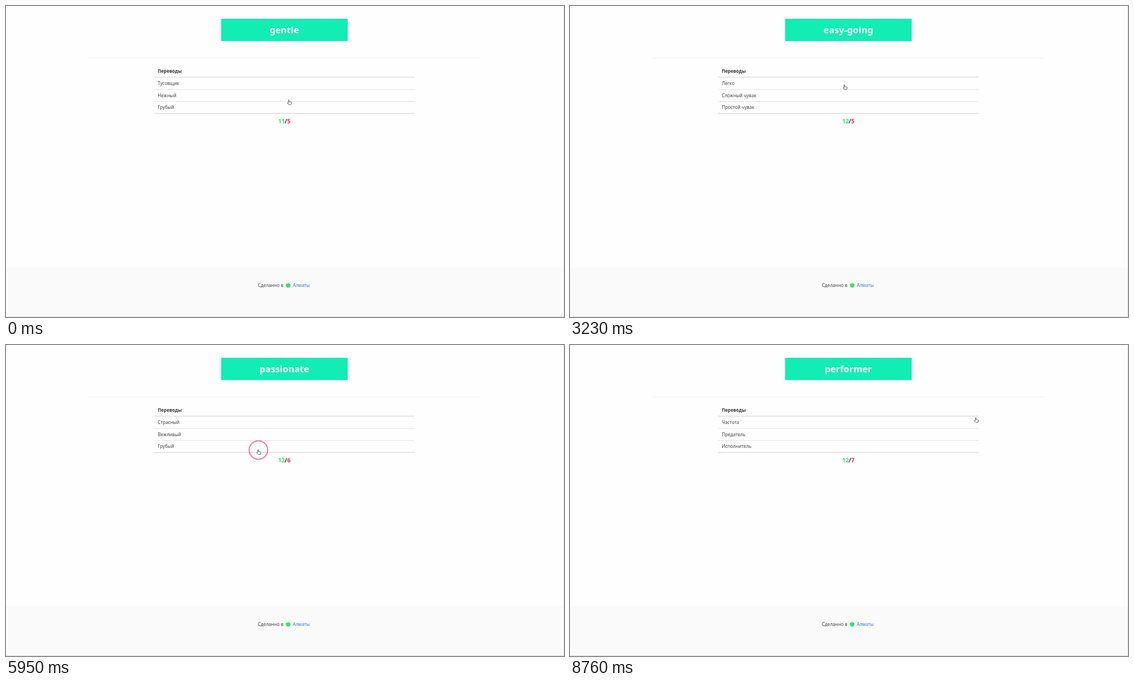
These frames come from a looping animation (1001x559 px, 8920 ms). An HTML page:

```html
<!DOCTYPE html>
<html lang="ru">
<head>
<meta charset="utf-8">
<title>Переводы</title>
<style>
  html, body { margin: 0; width: 100%; height: 100%; overflow: hidden; background: #fefefe; }
  svg { display: block; width: 100vw; height: 100vh; }
  text { font-family: "Noto Sans", "Open Sans", sans-serif; font-size: 8.1px; fill: #444; }
  .bold { font-weight: 700; }
  .title { font-size: 16.4px; fill: #fcfffe; text-anchor: middle; }
  .score { font-size: 10.4px; fill: #363636; text-anchor: middle; }
  .good { fill: #3fdc6b; }
  .bad { fill: #e9205f; }
</style>
</head>
<body>
<svg viewBox="0 0 1001 559">
  <rect width="1001" height="559" fill="#fefefe"/>
  <rect x="386" y="23" width="227" height="40" fill="#12edb3"/>
  <text id="word" class="bold title" x="499.3" y="49.2"></text>
  <rect x="148" y="93" width="704" height="1" fill="#f1f1f1"/>

  <text class="bold" x="272.3" y="120.2" style="fill:#363636">Переводы</text>
  <g fill="#d8d8d8">
    <rect x="266" y="127.3" width="467" height="1.2"/>
    <rect x="266" y="149.6" width="467" height=".9" fill="#e0e0e0"/>
    <rect x="266" y="171" width="467" height=".9" fill="#e0e0e0"/>
    <rect x="266" y="192.5" width="467" height="1.2"/>
  </g>
  <g id="rows"></g>
  <text class="bold score" x="499.3" y="210.8"><tspan id="right" class="good"></tspan>/<tspan id="wrong" class="bad"></tspan></text>

  <rect y="470" width="1001" height="88" fill="#fafafa"/>
  <rect y="558" width="1001" height="1" fill="#dedede"/>
  <rect x="1000" width="1" height="559" fill="#e6e6e6"/>
  <text x="452" y="505.4">Сделанно в</text>
  <g fill="#36e467">
    <path d="M506.2 499.2Q508.6 498 510 499.8Q511 502 509.4 504.8Q508 506.8 506.2 506.1Q504.4 506.8 503 504.8Q501.4 502 502.4 499.8Q503.8 498 506.2 499.2Z"/>
    <path d="M505.9 499V497.2L507 496.8V499Z"/>
  </g>
  <text x="514.5" y="505.4" style="fill:#3f75d6">Алматы</text>

  <circle id="ring" r="16.6" fill="none" stroke="#df1440" stroke-opacity=".55" stroke-width="2"/>
  <path id="hand" fill="#fff" stroke="#444" stroke-width=".85" stroke-linejoin="round"
    d="M2.6 1.3Q2.6 .5 3.3 .5Q4 .5 4 1.3V3.9L7.2 4.5Q8.3 4.8 8.2 5.9L7.6 8.6Q7.4 9.4 6.6 9.4H4Q3.4 9.4 3 8.9L.9 6.6Q.5 6 1 5.7Q1.5 5.4 2 5.8L2.6 6.3Z"/>
</svg>
<script>
const LOOP = 8920;
const GREEN = '#35ee66', RED = '#ee205e';
const ROW_EDGES = [128, 150, 171.4, 193];

// picked and correct are row indexes; the answer is shown from `answered`
const questions = [
  { start: 0, answered: 1050, word: 'gentle', options: ['Тусовщик', 'Нежный', 'Грубый'], picked: 1, correct: 1 },
  { start: 2080, answered: 4070, word: 'easy-going', options: ['Легко', 'Сложный чувак', 'Простой чувак'], picked: 0, correct: 2 },
  { start: 5200, answered: 6760, word: 'passionate', options: ['Страсный', 'Вежливый', 'Грубый'], picked: 2, correct: 0 },
  { start: 7880, answered: Infinity, word: 'performer', options: ['Частота', 'Предатель', 'Исполнитель'] }
];

// time, left, top; no position means hidden
const pointer = [
  [0, 504, 168], [100], [460, 495, 166], [890, 491, 161],
  [2870, 489.3, 152.5], [3040, 489.5, 143.5], [3230, 489, 141],
  [5060, 488, 149.5], [5200, 486.5, 158], [5360, 479, 170.5],
  [5510, 468.5, 177.5], [5650, 460, 183.5], [5800, 451, 187.5],
  [5950, 449, 187.5], [8760, 724.5, 130]
];
const presses = [[1050, 1200], [4070, 4320], [5950, 6940]];

const byId = id => document.getElementById(id);
const add = (parent, tag, attrs) => {
  const node = document.createElementNS('http://www.w3.org/2000/svg', tag);
  for (const key in attrs) node.setAttribute(key, attrs[key]);
  return parent.appendChild(node);
};
const setText = (node, value) => {
  if (node.textContent !== String(value)) node.textContent = value;
};
const show = (node, visible) => node.setAttribute('visibility', visible ? 'visible' : 'hidden');

const rows = [0, 1, 2].map(i => ({
  bar: add(byId('rows'), 'rect', {
    x: 266, y: ROW_EDGES[i], width: 466.6, height: ROW_EDGES[i + 1] - ROW_EDGES[i]
  }),
  label: add(byId('rows'), 'text', { x: 272.3, y: 142.2 + i * 21.6 })
}));

function render(t) {
  const question = questions.findLast(q => q.start <= t);
  const answered = t >= question.answered;
  setText(byId('word'), question.word);
  rows.forEach(({ bar, label }, i) => {
    const good = i === question.correct;
    setText(label, question.options[i]);
    bar.setAttribute('fill', good ? GREEN : RED);
    show(bar, answered && (good || i === question.picked));
  });

  const done = questions.filter(q => q.answered <= t);
  const hits = done.filter(q => q.picked === q.correct).length;
  setText(byId('right'), 11 + hits);
  setText(byId('wrong'), 5 + done.length - hits);

  const [, x, y] = pointer.findLast(p => p[0] <= t);
  const visible = x !== undefined;
  show(byId('hand'), visible);
  show(byId('ring'), visible && presses.some(([from, to]) => t >= from && t < to));
  if (visible) {
    byId('hand').setAttribute('transform', `translate(${x} ${y})`);
    byId('ring').setAttribute('transform', `translate(${x + 3.8} ${y + 1.3})`);
  }
}

const origin = performance.now();
function tick() {
  render((performance.now() - origin) % LOOP);
  requestAnimationFrame(tick);
}
tick();
</script>
</body>
</html>
```
